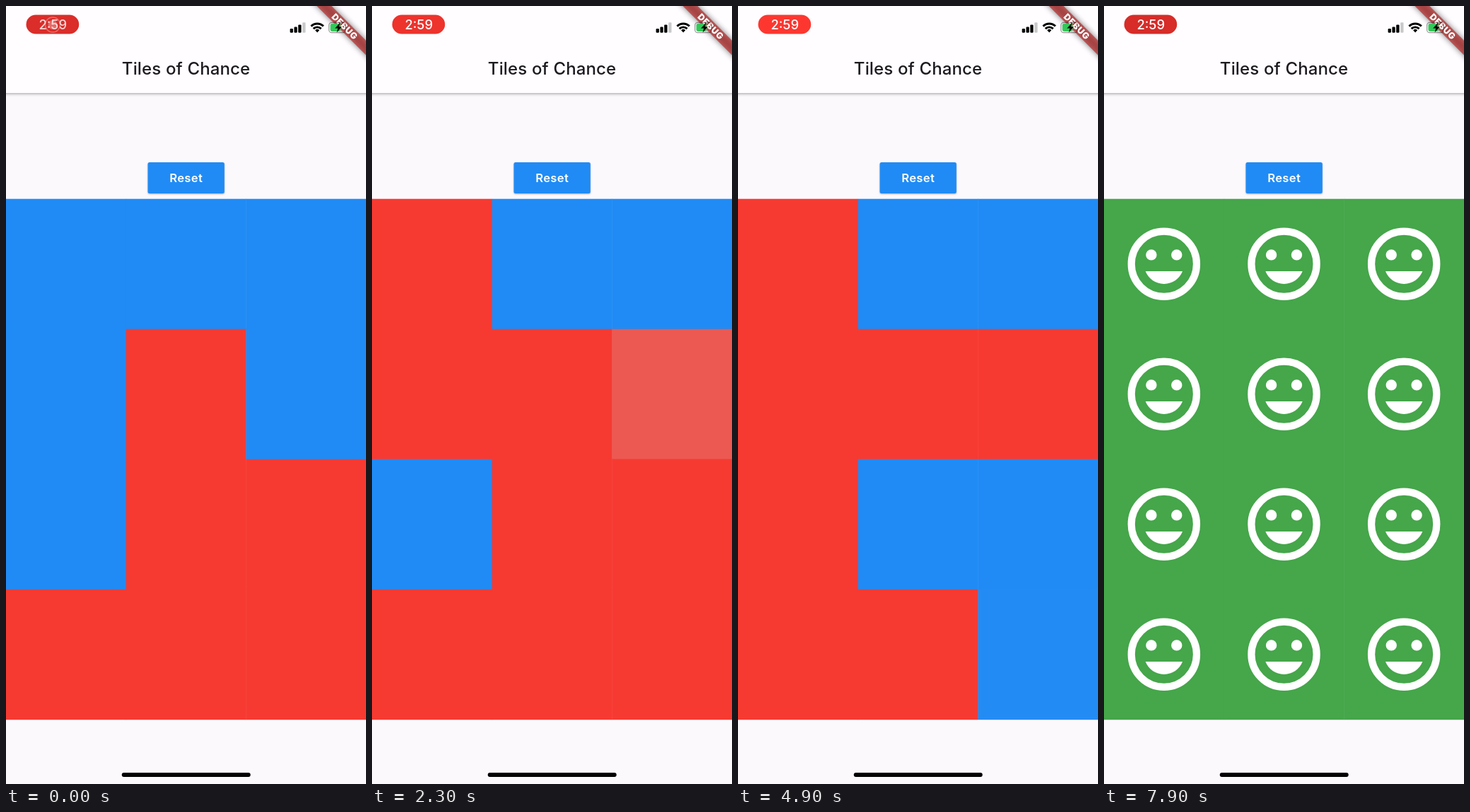
These frames come from a looping animation (509 by 1100 pixels, 8000 ms). An HTML page:

```html
<!DOCTYPE html>
<html lang="en">
<head>
<meta charset="utf-8">
<title>Tiles of Chance</title>
<style>
  html, body { margin: 0; width: 100%; height: 100%; overflow: hidden; background: #fcf9fd; }
  #stage { display: block; width: 509px; height: 1100px; }
  text { font-family: Inter, Roboto, sans-serif; text-anchor: middle; }
  .bar { filter: drop-shadow(0 1.5px 2px rgba(0, 0, 0, .38)); }
  .button { filter: drop-shadow(0 1.2px 1.2px rgba(0, 0, 0, .3)); }
</style>
</head>
<body>
<svg id="stage" viewBox="0 0 509 1100">
  <defs>
    <g id="smile" fill="#fff">
      <circle r="9" fill="none" stroke="#fff" stroke-width="2"/>
      <circle cx="-3.5" cy="-2.5" r="1.5"/>
      <circle cx="3.5" cy="-2.5" r="1.5"/>
      <path d="M0 5.5c2.33 0 4.31-1.46 5.11-3.5H-5.11c.8 2.04 2.78 3.5 5.11 3.5z"/>
    </g>
    <filter id="blur" x="-20%" y="-150%" width="140%" height="400%">
      <feGaussianBlur stdDeviation="4"/>
    </filter>
  </defs>

  <rect width="509" height="1100" fill="#fcf9fd"/>
  <rect class="bar" x="-10" y="-10" width="529" height="133" fill="#fffdff"/>
  <text x="254.6" y="97" font-size="24" font-weight="500" fill="#1d1b20" letter-spacing=".15">Tiles of Chance</text>
  <rect class="button" x="200.5" y="221" width="108.3" height="44" rx="2.5" fill="#208bf5"/>
  <text x="254.7" y="249" font-size="16.6" font-weight="600" fill="#fff" letter-spacing=".35">Reset</text>

  <g id="tiles"></g>

  <g transform="translate(509 0) rotate(45)">
    <rect x="-70" y="34.4" width="140" height="14.8" fill="#000" opacity=".5" filter="url(#blur)"/>
    <rect x="-70" y="34.4" width="140" height="14.8" fill="#b71c1c" opacity=".627"/>
    <text x="-.6" y="46.3" font-size="12.5" font-weight="900" fill="#fff" letter-spacing=".5">DEBUG</text>
  </g>

  <g id="pill">
    <rect id="pillBack" x="28.5" y="12.5" width="74.7" height="27" rx="13.5"/>
    <text id="clock" x="66.2" y="33" font-size="18.4" font-weight="500" fill="#fff">2:59</text>
    <g id="record" fill="none" stroke="#fff">
      <circle cx="66" cy="26.5" r="10.5" stroke-width="1.5"/>
      <circle cx="66" cy="26.5" r="6.5" fill="#fff" stroke="none"/>
    </g>
  </g>

  <g fill="#000">
    <rect x="401.6" y="32" width="4.3" height="5.8" rx="1.2"/>
    <rect x="407.4" y="29.6" width="4.3" height="8.2" rx="1.2"/>
    <rect x="413.2" y="26.4" width="4.3" height="11.4" rx="1.2"/>
    <rect x="419.2" y="23.2" width="4.3" height="14.6" rx="1.2" fill="#c9c8ca"/>
  </g>
  <g fill="none" stroke="#000" stroke-width="2.9">
    <path d="M431.4 28.6A12.3 12.3 0 0 1 448.8 28.6M434.6 32.1A7.8 7.8 0 0 1 445.6 32.1"/>
    <path d="M437.1 34.2A4.4 4.4 0 0 1 443.1 34.2L440.1 37.6z" fill="#000" stroke="none"/>
  </g>
  <rect x="456.6" y="23.3" width="23.6" height="14.4" rx="4" fill="none" stroke="#000" stroke-opacity=".4" stroke-width="1.2"/>
  <rect x="458.5" y="25.1" width="14.5" height="10.8" rx="2.4" fill="#35c759"/>
  <path d="M472.5 23.4L465.2 31.4H469.2L467.6 37.6L474.8 29.3H470.8z"/>

  <rect x="163.7" y="1084" width="182" height="6" rx="3"/>
</svg>
<script>
const LOOP = 8000, BLUE = '#208bf5', RED = '#f63a32', GREEN = '#45a64a';
const W = 509 / 3, H = 184, TOP = 272.7;
const OVERLAP = .5; // hides seams between neighbours
const FIRST = 'BBBBRBBRRRRR';
const WIN = 5486;
// Each tap: ripple start in ms, tile index
const TAPS = [[450, 0], [1505, 3], [2050, 5], [2710, 7], [3440, 6], [4130, 8], [4505, 11], [5416, 4]];
const FLIP_DELAY = 70, GROW = 225, LIFE = 410;

const $ = id => document.getElementById(id);
const clamp = v => Math.max(0, Math.min(1, v));

function add(parent, tag, attrs) {
  const el = document.createElementNS('http://www.w3.org/2000/svg', tag);
  set(el, attrs);
  return parent.appendChild(el);
}
function set(el, attrs) {
  for (const key in attrs) el.setAttribute(key, attrs[key]);
}

const tiles = [...FIRST].map((letter, i) => {
  const x = i % 3 * W, y = TOP + Math.floor(i / 3) * H;
  const back = add($('tiles'), 'rect', { x, y, width: W + OVERLAP, height: H + OVERLAP });
  const box = add($('tiles'), 'svg', { x, y, width: W, height: H, overflow: 'hidden' });
  return {
    back,
    blue: letter === 'B',
    ripple: add(box, 'circle', { fill: '#c8c8c8' }),
    face: add(box, 'use', { href: '#smile', transform: `translate(${W / 2} ${H / 2}) scale(5.125)` })
  };
});

function drawTile(tile, i, t) {
  const start = TAPS.find(tap => tap[1] === i)?.[0] ?? Infinity;
  const age = t - start;
  const won = t >= WIN;
  const blue = tile.blue !== (age >= FLIP_DELAY);
  set(tile.back, { fill: won ? GREEN : blue ? BLUE : RED });
  set(tile.face, { visibility: won ? 'visible' : 'hidden' });

  const active = age >= 0 && age < LIFE;
  set(tile.ripple, { visibility: active ? 'visible' : 'hidden' });
  if (!active) return;
  const grow = 1 - (1 - clamp(age / GROW)) ** 2;
  const fade = clamp(age / 75) * clamp((LIFE - age) / (LIFE - GROW));
  set(tile.ripple, {
    cx: W / 2 + 26 * (1 - grow),
    cy: H / 2 + 60 * (1 - grow),
    r: 36 + 94 * grow,
    opacity: .25 * fade
  });
}

function drawPill(t) {
  const glow = .5 + .5 * Math.cos((t - 4750) / 2000 * 2 * Math.PI);
  const mix = (low, high) => Math.round(low + (high - low) * glow);
  set($('pillBack'), { fill: `rgb(${mix(213, 255)},${mix(43, 56)},${mix(40, 47)})` });
  const icon = clamp(1 - t / 250);
  set($('record'), { opacity: .3 * icon });
  set($('clock'), { opacity: 1 - .2 * icon });
}

function frame(now) {
  const t = now % LOOP;
  tiles.forEach((tile, i) => drawTile(tile, i, t));
  drawPill(t);
  requestAnimationFrame(frame);
}
frame(0);
</script>
</body>
</html>
```
